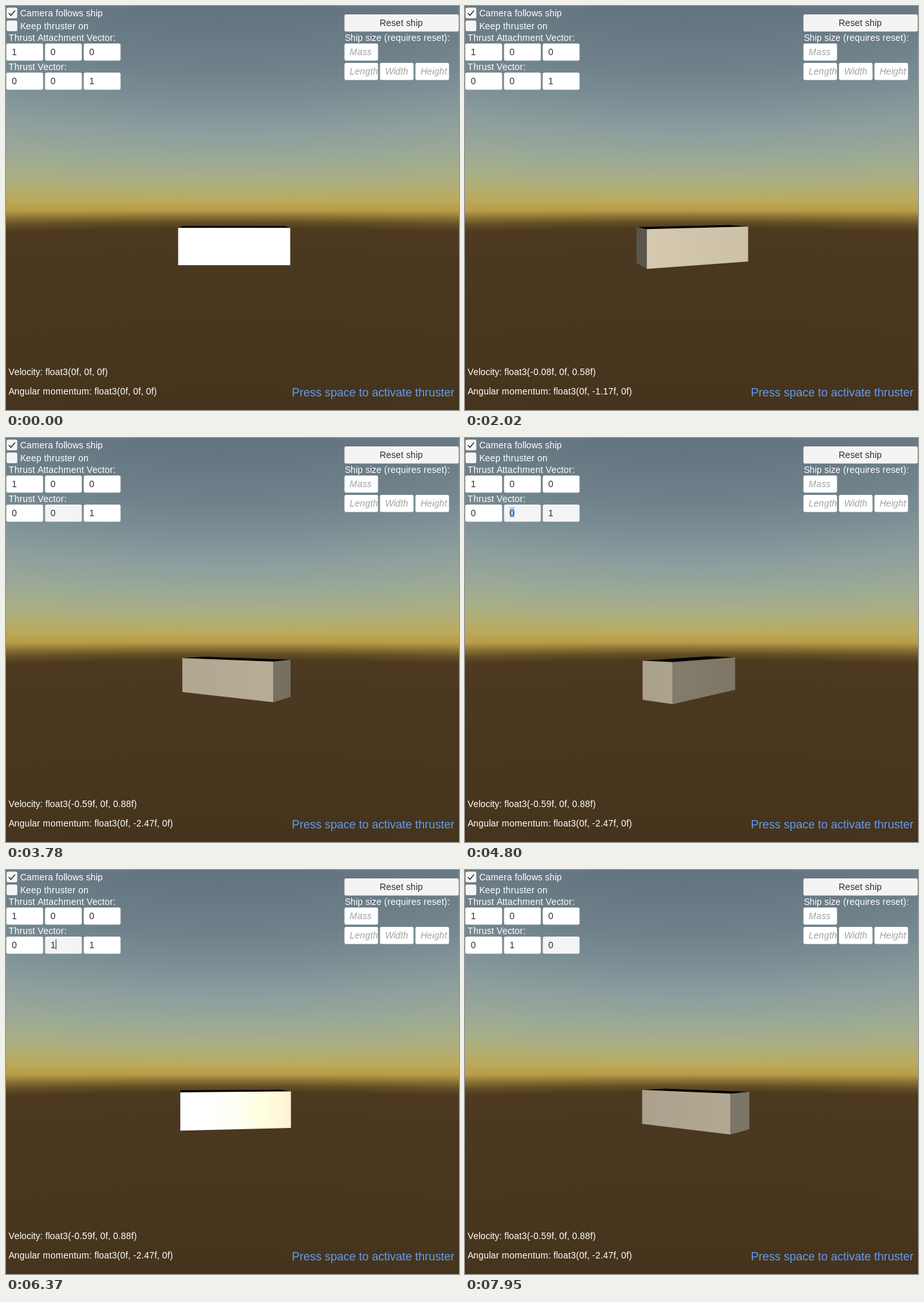
An HTML page with a canvas that plays this animation: 702 px wide and 625 px high, repeating every 8 s.

```html
<!DOCTYPE html>
<html lang="en">
<head>
<meta charset="utf-8">
<title>Ship thruster</title>
<style>
  html, body { margin: 0; width: 100%; height: 100%; overflow: hidden; background: #4b3820; }
  canvas { display: block; width: 100vw; height: 100vh; }
</style>
</head>
<body>
<canvas id="stage" width="702" height="625"></canvas>
<script>
const W = 702, H = 625, CX = W / 2, CY = H / 2;
const LOOP = 8;
const FOCAL = CY / Math.tan(Math.PI / 6);           // 60 degree vertical view
const SHIP = { x: 0.045, top: 0.53, z: 9.85 };      // relative to the camera
const BURN = 2.47, ANGULAR_ACC = 0.6, LINEAR_ACC = 0.5;
const FONT = '"Liberation Sans", Arial, sans-serif';
const INK = '#323232', IDLE = '#fff', HOVER = '#f4f4f4', PRESSED = '#c8c8c8';

const ctx = document.getElementById('stage').getContext('2d');
const sky = makeSky();

// Lines of equal elevation bow away from the horizon towards the sides.
function makeSky() {
  const canvas = document.createElement('canvas');
  canvas.width = W;
  canvas.height = H;
  const c = canvas.getContext('2d');
  const gradient = c.createLinearGradient(0, -CY, 0, CY);
  const stops = {
    0: '#62737f', 100: '#6f818a', 150: '#7c8f95', 200: '#8e9f9d', 238: '#9ba997',
    269: '#a9af85', 288: '#b3ae70', 303: '#bca95b', 316: '#b99c48', 325: '#8e7434',
    334: '#655026', 344: '#4d3a20', 375: '#4b3820', 625: '#45331b'
  };
  for (const y in stops) gradient.addColorStop(y / H, stops[y]);
  c.fillStyle = gradient;
  for (let x = 0; x < W; x++) {
    c.setTransform(1, 0, 0, Math.hypot(1, (x - CX) / FOCAL), 0, CY);
    c.fillRect(x, -CY, 1, H);
  }
  return canvas;
}

// The interface font advances by whole pixels.
function text(str, x, y, color = '#fff', size = 14, style = '') {
  ctx.font = `${style} ${size}px ${FONT}`;
  ctx.fillStyle = color;
  for (const ch of str) {
    ctx.fillText(ch, x, y);
    x += Math.round(ctx.measureText(ch).width);
  }
}

function panel(x, y, w, h, color) {
  ctx.fillStyle = color;
  ctx.beginPath();
  ctx.roundRect(x, y, w, h, 2.5);
  ctx.fill();
}

function field(x, y, value, { color = IDLE, selected = false, caret = false } = {}) {
  panel(x + 0.5, y, 57, 26.5, color);
  if (selected) {
    ctx.fillStyle = '#a8ceff';
    ctx.fillRect(x + 9, y + 4, 8, 16);
  }
  text(value, x + 9, y + 18, INK);
  if (caret) {
    ctx.fillStyle = INK;
    ctx.fillRect(x + 17, y + 4, 1, 16);
  }
}

function placeholder(x, y, label) {
  ctx.save();
  panel(x, y, 52, 26.5, IDLE);
  ctx.beginPath();
  ctx.rect(x, y, 51.5, 27);
  ctx.clip();
  text(label, x + 8, y + 18, '#a2a2a2', 14, 'italic');
  ctx.restore();
}

function polygon(points, fill) {
  ctx.fillStyle = fill;
  ctx.beginPath();
  for (const [x, y] of points) ctx.lineTo(x, y);
  ctx.closePath();
  ctx.fill();
}

// A vertical ship edge at local (x, z), seen by the camera.
function edge(x, z, angle) {
  const c = Math.cos(angle), s = Math.sin(angle);
  const px = SHIP.x + x * c - z * s, pz = SHIP.z + x * s + z * c;
  const scale = FOCAL / pz;
  return {
    top: [CX + px * scale, CY + SHIP.top * scale],
    bottom: [CX + px * scale, CY + (SHIP.top + 1) * scale],
    bearing: Math.atan2(px, pz) * 180 / Math.PI
  };
}

// Light shines along the view; a highlight shows on faces turned to the camera.
function shade(turn, bearing) {
  const base = 272 - 2.67 * Math.abs(turn + bearing / 5);
  const gloss = 100 * Math.exp(-((turn + bearing / 2) ** 2) / 80);
  return `rgb(${[1, 0.945, 0.82].map(k => Math.min(255, Math.round(base * k + gloss)))})`;
}

function drawShip(angle) {
  const corners = [[-1.5, -0.5], [1.5, -0.5], [1.5, 0.5], [-1.5, 0.5]];
  polygon(corners.map(([x, z]) => edge(x, z, angle).top), '#050402');
  for (let side = 0; side < 4; side++) {
    const facing = angle + side * Math.PI / 2;
    const [half, depth] = side % 2 ? [0.5, 1.5] : [1.5, 0.5];
    const left = edge(-half, -depth, facing), right = edge(half, -depth, facing);
    if (left.top[0] >= right.top[0]) continue;
    const turn = Math.atan2(Math.sin(facing), Math.cos(facing)) * 180 / Math.PI;
    const fill = ctx.createLinearGradient(left.top[0], 0, right.top[0], 0);
    for (let i = 0; i <= 4; i++) {
      const bearing = left.bearing + (right.bearing - left.bearing) * i / 4;
      fill.addColorStop(i / 4, shade(turn, bearing));
    }
    polygon([left.top, right.top, right.bottom, left.bottom], fill);
  }
}

// The thruster turns with the ship while it burns, then the ship spins freely.
function physics(time) {
  const burn = Math.min(time, BURN), steps = 200, dt = burn / steps;
  let vx = 0, vz = 0;
  for (let i = 0; i < steps; i++) {
    const a = ANGULAR_ACC / 2 * ((i + 0.5) * dt) ** 2;
    vx -= LINEAR_ACC * Math.sin(a) * dt;
    vz += LINEAR_ACC * Math.cos(a) * dt;
  }
  const angle = ANGULAR_ACC * (burn * burn / 2 + burn * (time - burn));
  return { angle, velocity: [vx, 0, vz], momentum: [0, -burn, 0] };
}

const float3 = v => `float3(${v.map(n => (+n.toFixed(2) || 0) + 'f').join(', ')})`;

function drawInterface(t) {
  const within = (from, to) => t >= from && t < to;
  const blink = (t - 5.03) % 1.09 < 0.53;

  panel(1, 2.5, 16.5, 16.5, HOVER);
  panel(1, 22.5, 16.5, 16.5, HOVER);
  ctx.strokeStyle = INK;
  ctx.lineWidth = 1.5;
  ctx.beginPath();
  ctx.moveTo(4.5, 11);
  ctx.lineTo(7.5, 14.5);
  ctx.lineTo(14, 7);
  ctx.stroke();
  text('Camera follows ship', 22, 16);
  text('Keep thruster on', 22, 36);

  text('Thrust Attachment Vector:', 4, 54);
  ['1', '0', '0'].forEach((v, i) => field(i * 60, 58, v));

  text('Thrust Vector:', 4, 99);
  field(0, 103, '0');
  field(60, 103, t < 5.03 ? '0' : '1', {
    color: within(4.35, 4.6) ? PRESSED : within(3.7, 7) ? HOVER : IDLE,
    selected: within(4.5, 5.03),
    caret: within(5.03, 7) && blink
  });
  field(120, 103, t < 7.7 ? '1' : '0', {
    color: within(7, 7.25) ? PRESSED : within(4.65, 5.6) || t >= 7 ? HOVER : IDLE,
    selected: within(7.2, 7.7),
    caret: t >= 7.7 && blink
  });

  panel(524.5, 13, 177, 26.5, HOVER);
  text('Reset ship', 579, 31, INK);
  text('Ship size (requires reset):', 525, 54);
  placeholder(524.5, 58, 'Mass');
  placeholder(524.5, 88, 'Length');
  placeholder(579.5, 88, 'Width');
  placeholder(634.5, 88, 'Height');
  text('Press space to activate thruster', 443, 604, '#609cf2', 18);
}

function draw(t) {
  // The view refreshes about every 46 ms once the thruster has fired.
  const tick = 0.91 + 0.0463 * Math.floor((t - 0.9) / 0.0463);
  const ship = physics(t < 0.91 ? 0 : (tick - 0.862) * 1.0115);
  ctx.drawImage(sky, 0, 0);
  drawShip(ship.angle);
  drawInterface(t);
  text('Velocity: ' + float3(ship.velocity), 4, 571);
  text('Angular momentum: ' + float3(ship.momentum), 4, 601);
}

const start = performance.now();
function frame() {
  draw((performance.now() - start) / 1000 % LOOP);
  requestAnimationFrame(frame);
}
frame();
</script>
</body>
</html>
```
